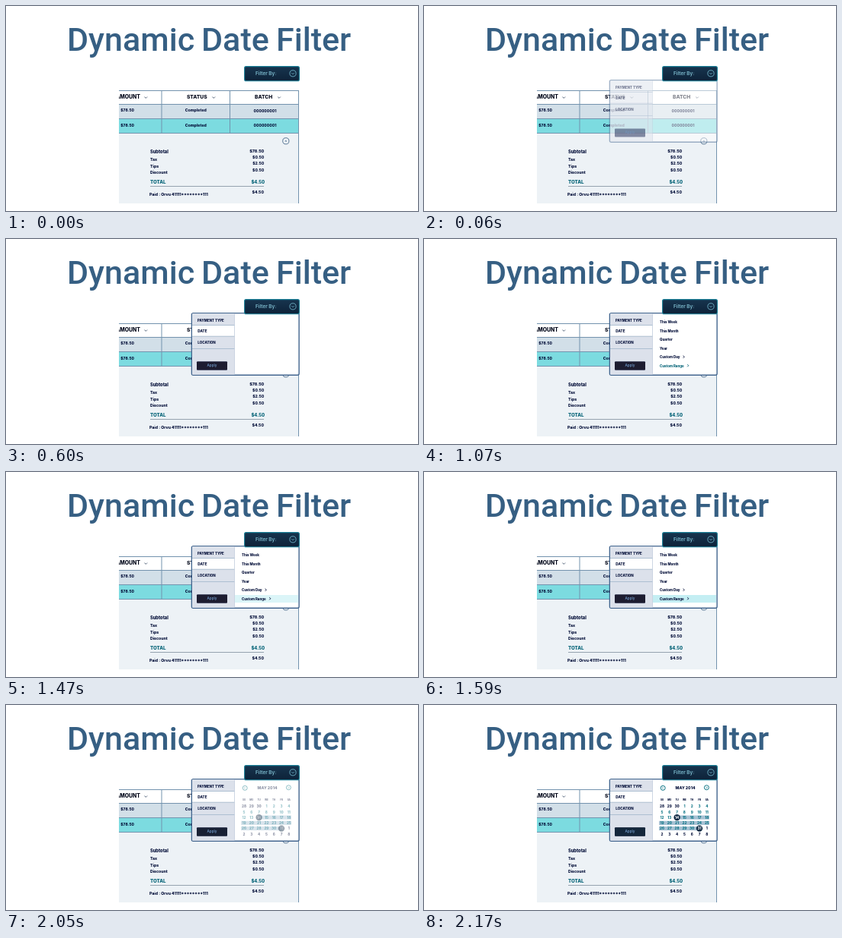
These frames come from a looping animation (540 by 270 pixels, 4940 ms). An HTML page with a canvas:

```html
<!DOCTYPE html>
<html lang="en">
<head>
<meta charset="utf-8">
<title>Dynamic Date Filter</title>
<style>
  html, body { margin: 0; width: 100%; height: 100%; overflow: hidden; background: #fff; }
  canvas { display: block; width: 540px; height: 270px; }
</style>
</head>
<body>
<canvas id="stage"></canvas>
<script>
const LOOP = 4940, STEP = 30;
const NAVY = '#030e38', TEAL = '#046377', EDGE = '#7393ae';
const canvas = document.getElementById('stage');
const ctx = canvas.getContext('2d');
const dpr = window.devicePixelRatio || 1;
canvas.width = 540 * dpr;
canvas.height = 270 * dpr;

// Progress that already shows its first step at the start time.
const fade = (t, from, to) => t < from ? 0 : Math.min(1, (t - from + STEP) / (to - from + STEP));

function text(str, x, y, size, color = NAVY, align = 'left', weight = 800) {
  ctx.font = `${weight} ${size}px Inter, "Open Sans", sans-serif`;
  ctx.fillStyle = color;
  ctx.textAlign = align;
  ctx.fillText(str, x, y);
}

function rect(x, y, w, h, color) {
  ctx.fillStyle = color;
  ctx.fillRect(x, y, w, h);
}

function box(x, y, w, h, r, fill, stroke, width = 1) {
  ctx.beginPath();
  ctx.roundRect(x, y, w, h, r);
  ctx.fillStyle = fill;
  ctx.fill();
  if (!stroke) return;
  ctx.strokeStyle = stroke;
  ctx.lineWidth = width;
  ctx.stroke();
}

function line(points, color, width = 1) {
  ctx.beginPath();
  points.forEach(([x, y]) => ctx.lineTo(x, y));
  ctx.strokeStyle = color;
  ctx.lineWidth = width;
  ctx.stroke();
}

function circle(x, y, r, stroke, width = 0.9, fill) {
  ctx.beginPath();
  ctx.arc(x, y, r, 0, Math.PI * 2);
  if (fill) { ctx.fillStyle = fill; ctx.fill(); }
  if (stroke) { ctx.strokeStyle = stroke; ctx.lineWidth = width; ctx.stroke(); }
}

const down = (x, y, s, color, w = 0.9) =>
  line([[x - s, y - s / 2], [x, y + s / 2], [x + s, y - s / 2]], color, w);

// A negative size points left.
const side = (x, y, s, color, w = 0.9) =>
  line([[x - s / 2, y - Math.abs(s)], [x + s / 2, y], [x - s / 2, y + Math.abs(s)]], color, w);

function withAlpha(a, draw) {
  if (a <= 0) return;
  ctx.save();
  ctx.globalAlpha *= a;
  draw();
  ctx.restore();
}

function drawTitle() {
  ctx.font = '500 43px Roboto, sans-serif';
  ctx.fillStyle = '#365f83';
  ctx.textAlign = 'left';
  ctx.fillText('Dynamic', 80, 59);
  ctx.fillText('Date', 256, 59);
  ctx.fillText('Filter', 354, 59);
}

function drawTable() {
  ctx.save();
  ctx.beginPath();
  ctx.rect(148, 105, 240, 155);
  ctx.clip();

  rect(148, 129, 235.5, 19, '#d2dfe8');
  rect(148, 148, 235.5, 19, '#7cdbe0');
  rect(148, 167, 235.5, 93, '#edf2f6');
  for (const y of [111.5, 129.5, 148.5, 167.5]) line([[148, y], [384, y]], EDGE);
  for (const x of [204, 293.5]) line([[x, 111], [x, 167]], EDGE);
  line([[383.5, 111], [383.5, 260]], EDGE);

  const ink = '#050a1c';
  text('AMOUNT', 176, 122.3, 6.9, ink, 'right');
  text('STATUS', 237, 122.3, 6.7, ink);
  text('BATCH', 326, 122.3, 6.7, ink);
  for (const x of [183.3, 272.3, 358]) down(x, 120.5, 1.8, '#42546b');
  for (const y of [139, 158.7]) {
    text('$78.50', 150.3, y, 5);
    text('Completed', 234.7, y, 5.2);
    text('000000001', 324.5, y + 0.6, 5);
  }
  ctx.restore();
}

function drawReceipt() {
  circle(366.8, 177.8, 4.1, '#47688a', 0.9);
  line([[365.9, 176.9], [367.7, 178.7]], '#47688a', 0.8);
  line([[367.7, 176.9], [365.9, 178.7]], '#47688a', 0.8);

  const rows = [
    ['Subtotal', 194, '$78.50', 193, 5.7],
    ['Tax', 204, '$0.50', 200.5, 5.1],
    ['Tips', 212.5, '$2.50', 209, 5.1],
    ['Discount', 221, '$0.50', 217.5, 5.1]
  ];
  for (const [name, y, sum, y2, size] of rows) {
    text(name, 189, y, size);
    text(sum, 338.3, y2, Math.min(size, 5.4), NAVY, 'right');
  }
  text('TOTAL', 189, 234, 6.2, TEAL);
  text('$4.50', 339, 233.5, 5.9, TEAL, 'right');
  line([[189, 237.5], [338, 237.5]], '#8d9aa8', 0.9);
  text('Paid : Orvu 41111********111', 188, 249.7, 5.2);
  text('$4.50', 338, 247, 5.2, NAVY, 'right');
}

function drawButton() {
  const g = ctx.createLinearGradient(0, 79, 0, 99);
  g.addColorStop(0, '#17354f');
  g.addColorStop(1, '#0d2238');
  box(312.6, 79.6, 71.8, 19.2, 2, g, '#1b8198', 1.1);
  text('Filter By:', 327, 91.2, 6.4, '#7fbdd0', 'left', 600);
  circle(376, 88.8, 4.1, '#6fb0c4', 0.9);
  down(376, 89, 1.7, '#6fb0c4');
}

function drawList(t) {
  const hover = fade(t, 1470, 1590);
  if (hover) withAlpha(0.5 + 0.5 * hover, () => rect(300, 162, 83, 10, '#c4eef3'));
  const last = t >= 1070 && t < 1470 ? TEAL : NAVY;
  ['This Week', 'This Month', 'Quarter', 'Year', 'Custom Day', 'Custom Range'].forEach((s, i) => {
    const color = i === 5 ? last : NAVY;
    const y = 111 + i * 11.5;
    text(s, 309, y, 4.4, color);
    if (i > 3) side(i === 4 ? 340.5 : 346, y - 1.8, 1.6, color);
  });
}

function drawCalendar() {
  const colX = c => 312 + c * 9.8;
  const rowY = r => 133.6 + r * 7.25;
  const blue = '#0b7484';
  text('MAY 2014', 342.5, 111.3, 5.1, NAVY, 'center');
  circle(313.2, 109.3, 3, blue, 1);
  circle(370.4, 108.7, 3, blue, 1);
  side(313, 109.3, -1.2, blue, 0.8);
  side(370.6, 108.7, 1.2, blue, 0.8);
  ['SU', 'MO', 'TU', 'WE', 'TH', 'FR', 'SA'].forEach((d, c) =>
    text(d, colX(c), 125.6, 3, NAVY, 'center'));

  const band = '#a8c2d4';
  rect(332, rowY(2) - 2.6, 42, 5.2, band);
  rect(308, rowY(3) - 2.6, 66, 5.2, band);
  rect(308, rowY(4) - 2.6, 53, 5.2, band);
  for (let i = 0; i < 42; i++) {
    const c = i % 7, r = Math.floor(i / 7), day = i - 2;
    const inMonth = day > 0 && day < 32;
    const picked = day === 14 || day === 31;
    if (picked) circle(colX(c), rowY(r), 4.2, null, 0, '#122c45');
    const label = day < 1 ? day + 30 : day > 31 ? day - 31 : day;
    text(label, colX(c), rowY(r) + 1.7, 4.6, picked ? '#fff' : inMonth ? blue : NAVY, 'center');
  }
}

function drawPanel(t) {
  box(243.4, 97.6, 140.7, 81.7, 2, '#fff', '#43668f', 1.4);
  rect(244.1, 98.3, 55.4, 80.3, '#dce1eb');
  withAlpha(fade(t, 540, 600), () => rect(244.1, 114, 55.4, 14, '#fff'));
  for (const y of [113.5, 128.2, 144.5]) line([[244.1, y], [299.5, y]], '#a9bbce', 0.9);
  line([[299.5, 98.3], [299.5, 178.6]], '#bcc8d8', 0.7);
  text('PAYMENT TYPE', 251, 108.6, 4.4);
  text('DATE', 251.3, 123, 4.6);
  text('LOCATION', 251.3, 138, 4.5);

  const apply = color => box(250, 161.6, 40, 10.8, 1, color);
  apply('#1f2a55');
  withAlpha(fade(t, 150, 310), () => apply('#1d1c30'));
  withAlpha(fade(t, 1990, 2170), () => apply('#13263b'));
  text('Apply', 270, 168.4, 4.7, '#749fd0', 'center', 500);

  if (t < 1960) withAlpha(fade(t, 870, 900), () => drawList(t));
  withAlpha(fade(t, 1990, 2170), drawCalendar);
}

function draw(t) {
  ctx.setTransform(dpr, 0, 0, dpr, 0, 0);
  rect(0, 0, 540, 270, '#fff');
  drawTitle();
  drawTable();
  drawReceipt();
  withAlpha(fade(t, 30, 120), () => drawPanel(t));
  drawButton();
}

const start = performance.now();
function tick() {
  draw((performance.now() - start) % LOOP);
  requestAnimationFrame(tick);
}
tick();
</script>
</body>
</html>
```
